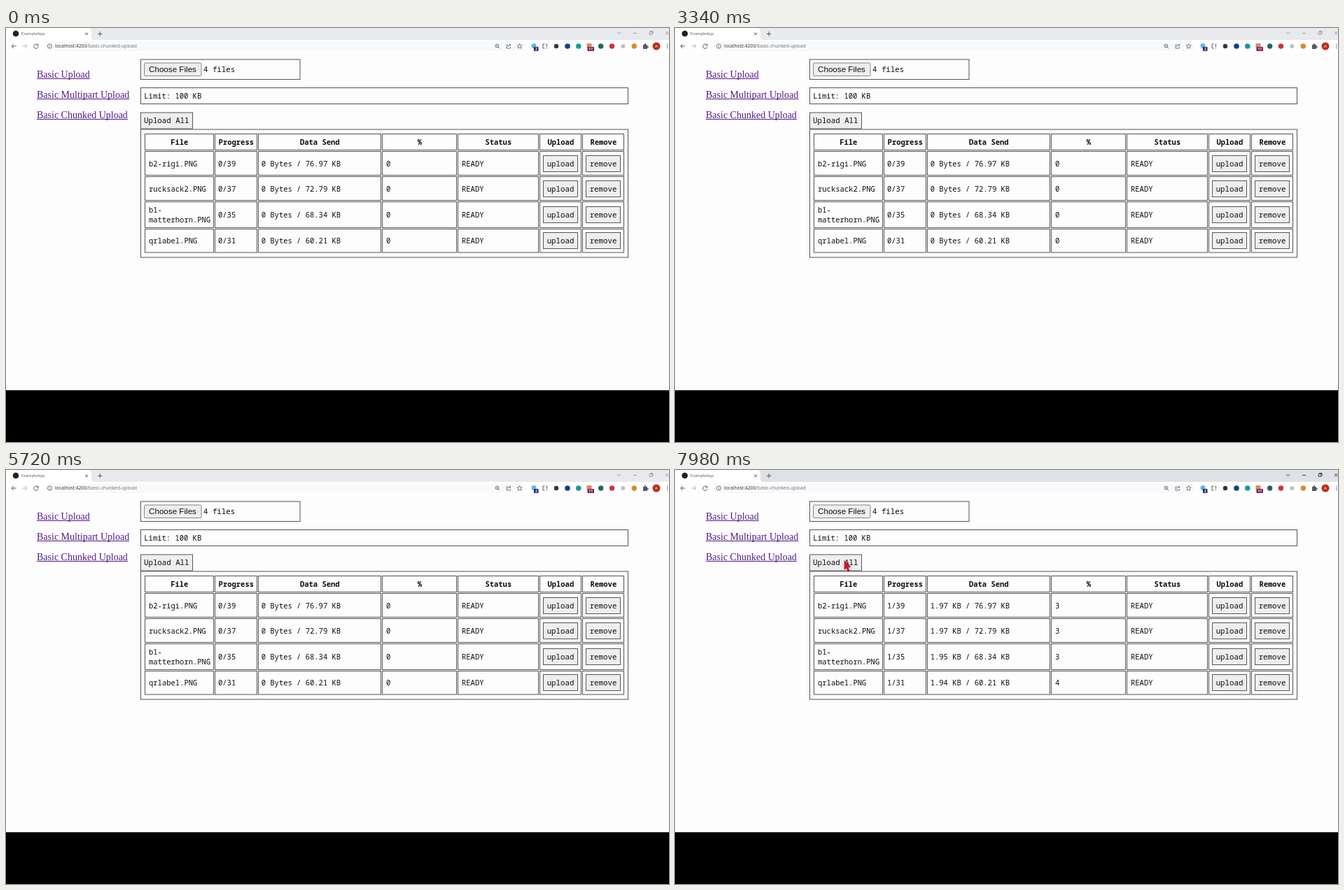
An HTML page that plays this animation: 947x592 px, repeating every 8 s.

```html
<!DOCTYPE html>
<html lang="en">
<head>
<meta charset="utf-8">
<title>Chunked upload</title>
<style>
  html, body { margin: 0; width: 100%; height: 100%; overflow: hidden; background: #fdfdfd; }
  svg { display: block; width: 947px; height: 592px; }
  text { white-space: pre; }
  .mono { font: 10.5px "Noto Sans Mono", monospace; fill: #0c0c0c; }
  .form { font-size: 10.75px; }
  .head { font-weight: 700; text-anchor: middle; }
  .mid { text-anchor: middle; }
  .link { font: 14px "Liberation Serif", serif; fill: #551a8b; }
  .ui { font-family: "Open Sans", sans-serif; }
  .box { fill: none; stroke: #53535b; }
  .btn { fill: #eee; stroke: #56565a; }
  .ico { fill: none; stroke: #55585c; stroke-width: 1; }
</style>
</head>
<body>
<svg id="stage" viewBox="0 0 947 592"></svg>
<script>
const LOOP = 8000, FOCUS = 6900, FIRST_CHUNK = 7700, ROW_DELAY = 40;
const stage = document.getElementById('stage');

function add(tag, attrs, text) {
  const el = document.createElementNS('http://www.w3.org/2000/svg', tag);
  for (const k in attrs) el.setAttribute(k, attrs[k]);
  if (text !== undefined) el.textContent = text;
  return stage.appendChild(el);
}
const rect = (x, y, x2, y2, attrs) => add('rect', { x, y, width: x2 - x, height: y2 - y, ...attrs });
const box = (x, y, x2, y2, cls = 'box') => rect(x, y, x2, y2, { class: cls });
const path = (d, attrs) => add('path', { d, class: 'ico', ...attrs });
const dot = (cx, cy, r, fill) => add('circle', { cx, cy, r, fill });
const mono = (x, y, s, cls = '') => add('text', { x, y, class: 'mono ' + cls }, s);
const ui = (x, y, size, fill, s, more) => add('text', { x, y, class: 'ui', 'font-size': size, fill, ...more }, s);

// Browser window
const strip = rect(0, 0, 947, 17, {});
path('M0 0H118Q122 1 122 6V12Q122 17 126 17H0Z', { style: 'fill:#fff;stroke:none' });
rect(0, 17, 947, 36, { fill: '#fff' });
rect(55, 19, 743, 33, { fill: '#f8f9fa', rx: 7 });
rect(0, 518, 947, 592, { fill: '#000' });
dot(14, 8, 4.3, '#222');
ui(22, 10.4, 5.7, '#55585c', 'ExampleApp');
path('M113.3 6.6l3.6 3.6m0-3.6l-3.6 3.6', { style: 'stroke:#444;stroke-width:.9' });
path('M131 8.4h6.4m-3.2-3.2v6.4');
const controls = [
  path('M873 6l2.6 2.6L878.2 6'),
  path('M896 7.5h5'),
  path('M919.2 5.7h3.6v3.6h-3.6zM920.5 5.5v-1h3.5v3.5h-1'),
  path('M942 5l4.5 4.5m0-4.5l-4.5 4.5')
];
path('M14.5 26H8m3-3l-3 3 3 3');
path('M23.5 26H30m-3-3l3 3-3 3', { style: 'stroke:#b4b6b9' });
path('M45.5 24.2a3.2 3.2 0 1 0 .6 2.6M46 22.7v2.3h-2.3');
path('M59.4 26a3.1 3.1 0 1 0 6.2 0a3.1 3.1 0 1 0-6.2 0M62.5 25.6v2M62.5 24v.8', { style: 'stroke-width:.8' });
const url = ui(70, 28.3, 6.72, '#303236', 'localhost:4200');
const tail = document.createElementNS(url.namespaceURI, 'tspan');
tail.setAttribute('fill', '#6b6e72');
tail.textContent = '/basic-chunked-upload';
url.append(tail);

// Toolbar actions and extensions
path('M699 25.5a2.4 2.4 0 1 0 4.8 0a2.4 2.4 0 1 0-4.8 0M703.2 27.3l2 2M700.3 25.5h2.2', { style: 'stroke-width:.9' });
path('M717 24h-2v5h5.5v-2M716.8 27q.3-3 3.7-3M719 22.5l2 1.6-2 1.6', { style: 'stroke-width:.8' });
path('M733.7 22.5l1 2.2 2.5.3-1.8 1.7.5 2.4-2.2-1.2-2.2 1.2.5-2.4-1.8-1.7 2.5-.3z', { style: 'stroke-width:.8' });
dot(754, 25.5, 3.5, '#62b5ee');
rect(754, 27, 760.5, 33, { fill: '#18236e', rx: 1 });
ui(757.2, 32, 5.5, '#fff', '2', { 'text-anchor': 'middle', 'font-weight': 700 });
path('M769.5 23h-2.5v6h2.5M772.5 22.5v4.5M772.5 28v1.3');
dot(786, 26, 3.2, '#30343c');
dot(802, 26, 3.8, '#153f86');
dot(817.8, 26, 3.8, '#159b9a');
rect(829.5, 22, 836.5, 28, { fill: '#d98b62', rx: 1 });
rect(830.5, 27, 840, 33, { fill: '#7a1957', rx: 1 });
ui(835.2, 32, 5.3, '#fff', '11', { 'text-anchor': 'middle', 'font-weight': 700 });
dot(849.7, 26, 3.7, '#216667');
dot(865.5, 26, 3.7, '#d3303a');
dot(881.3, 26, 3, '#bfc0c1');
dot(897.3, 26, 3.7, '#e18430');
path('M910 24h2q-.5-2 1-2t1 2h2v2q2-.4 2 1t-2 1v2h-6z', { style: 'fill:#55585c;stroke:none' });
dot(929, 26, 5.5, '#bd2d16');
ui(929, 28.2, 6, '#fff', 'A', { 'text-anchor': 'middle' });
for (const y of [23.5, 26, 28.5]) dot(944.8, y, .75, '#55585c');

// Page
['Basic Upload', 'Basic Multipart Upload', 'Basic Chunked Upload'].forEach((s, i) => {
  const y = 71 + i * 29;
  const link = add('text', { x: 44, y, class: 'link' }, s);
  rect(44, y + 1, 44 + link.getComputedTextLength(), y + 2, { fill: '#551a8b' });
});
box(192.5, 45, 420, 73.5);
rect(197.5, 50, 279, 68.5, { fill: '#eee', stroke: '#85858a', rx: 1.5 });
add('text', { x: 204, y: 63.3, fill: '#0c0c0c', style: 'font:11.65px "Liberation Sans",sans-serif' }, 'Choose Files');
mono(282, 63, '4 files', 'form');
box(192.5, 85.5, 888.5, 108.5);
mono(197.3, 101, 'Limit: 100 KB');
box(192.5, 121, 266.5, 144, 'btn');
mono(197, 136, 'Upload All', 'form');
box(192.5, 145, 888.5, 328);

const cols = [[198.5, 296.5], [298.5, 358.5], [360.5, 535.5], [537.5, 643.5],
              [645.5, 760.5], [762.5, 821.5], [823.5, 882.5]];
const lines = (top, bottom) => cols.forEach(([a, b]) => box(a, top, b, bottom));

lines(151.5, 174.5);
['File', 'Progress', 'Data Send', '%', 'Status', 'Upload', 'Remove'].forEach((s, i) =>
  mono((cols[i][0] + cols[i][1]) / 2 + .3, 167, s, 'head'));

const files = [
  { name: ['b2-rigi.PNG'], y: 176.5, h: 34, chunks: 39, size: '76.97', sent: '1.97', pct: 3 },
  { name: ['rucksack2.PNG'], y: 212.5, h: 34, chunks: 37, size: '72.79', sent: '1.97', pct: 3 },
  { name: ['b1-', 'matterhorn.PNG'], y: 248.5, h: 37, chunks: 35, size: '68.34', sent: '1.95', pct: 3 },
  { name: ['qrlabel.PNG'], y: 287.5, h: 33.5, chunks: 31, size: '60.21', sent: '1.94', pct: 4 }
];
for (const f of files) {
  const mid = f.y + f.h / 2, base = mid + 4;
  lines(f.y, f.y + f.h);
  f.name.forEach((s, i) => mono(204, base + (i - (f.name.length - 1) / 2) * 13.5, s));
  f.cells = [303, 364.7, 543].map(x => mono(x, base, ''));
  mono(651, base, 'READY');
  [[767.5, 'upload'], [828.5, 'remove']].forEach(([x, s]) => {
    const top = Math.round(mid) - 11.5;
    box(x, top, x + 49, top + 23, 'btn');
    mono(x + 24.5, base, s, 'form mid');
  });
}

const cursor = path('M242 129.5V142.5L244.8 140.3L247 145L249.4 143.9L247.2 139.4L251 138.8Z',
  { style: 'fill:#e30f1b;stroke:#6d1820;stroke-width:.5' });

function draw(t) {
  const active = t >= FOCUS;
  strip.setAttribute('fill', active ? '#dee1e6' : '#e8eaed');
  controls.forEach(c => c.style.stroke = active ? '#3c3e42' : '#9a9da1');
  cursor.setAttribute('visibility', active ? 'visible' : 'hidden');
  files.forEach((f, i) => {
    const done = t >= FIRST_CHUNK + i * ROW_DELAY;
    f.cells[0].textContent = `${+done}/${f.chunks}`;
    f.cells[1].textContent = `${done ? f.sent + ' KB' : '0 Bytes'} / ${f.size} KB`;
    f.cells[2].textContent = done ? f.pct : 0;
  });
}

const start = performance.now();
function tick() {
  draw((performance.now() - start) % LOOP);
  requestAnimationFrame(tick);
}
draw(0);
requestAnimationFrame(tick);
</script>
</body>
</html>
```
